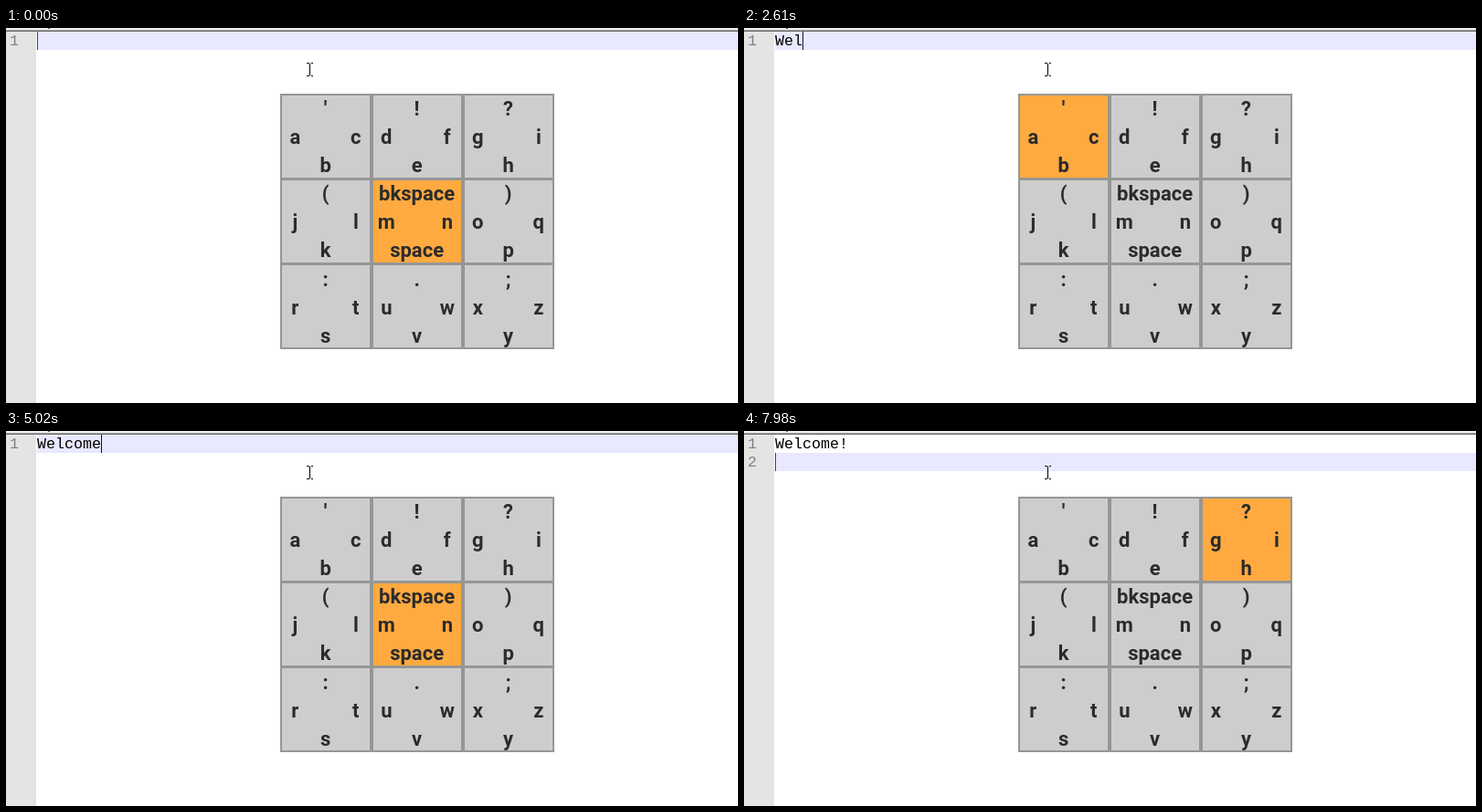
An HTML page that plays this animation: 801 px wide and 411 px high, repeating every 8 s.

```html
<!DOCTYPE html>
<html lang="en">
<head>
<meta charset="utf-8">
<title>Nine-key typing</title>
<style>
  html, body { margin: 0; width: 100%; height: 100%; overflow: hidden; background: #fff; }
  svg { display: block; width: 801px; height: 411px; }
  rect { shape-rendering: crispEdges; }
  .code { font: 16.667px "Courier New", "Liberation Mono", monospace; }
  .num { fill: #808080; }
  .label { font: 700 22px Roboto, sans-serif; fill: #2b2b2b; text-anchor: middle; }
  .popup { fill: #fff; stroke: #a8a8a8; filter: drop-shadow(2px 2px 2px rgba(0, 0, 0, .35)); }
</style>
</head>
<body>
<svg viewBox="0 0 801 411">
  <rect width="801" height="411" fill="#fff"/>
  <rect y="4" width="33" height="407" fill="#e4e4e4"/>
  <rect width="801" height="2" fill="#f0f0f0"/>
  <rect y="2" width="801" height="1" fill="#a0a0a0"/>
  <rect y="3" width="801" height="1" fill="#696969"/>
  <rect x="46" width="2" height="1" fill="#606060"/>

  <rect id="current" x="34" y="4" width="767" height="20" fill="#e8e8ff"/>
  <text class="code num" x="4" y="19">1</text>
  <text class="code num" id="second" x="4" y="39">2</text>
  <text class="code" id="typed" x="34" y="19"></text>
  <rect id="caret" width="1" height="20"/>
  <rect id="popup" class="popup" x="32.5" y="24.5" width="157" height="27"/>

  <rect x="300" y="72" width="300" height="280" fill="#969696"/>
  <g id="keys"></g>
  <g id="letters"></g>
  <g id="symbols"></g>

  <path d="M329 38.5h2.5M333.500 38.500h2.500M332.500 39v13M329 52.500h2.500M333.500 52.500h2.500" stroke="#000" fill="none" shape-rendering="crispEdges"/>
</svg>
<script>
const $ = id => document.getElementById(id);
const LOOP = 8000;

function add(parent, tag, attrs, text = '') {
  const node = document.createElementNS('http://www.w3.org/2000/svg', tag);
  for (const name in attrs) node.setAttribute(name, attrs[name]);
  node.textContent = text;
  parent.append(node);
  return node;
}

// Each key lists its top, left, right and bottom labels.
const letters = ["' a c b", '! d f e', '? g i h', '( j l k', 'bkspace m n space', ') o q p',
  ': r t s', '. u w v', '; x z y'];
const symbols = ['1 2 3 4', '5 6 7 8', '9 0 # =', '[ { } @', 'del esc tab enter', '] < > ^',
  '" $ & ;', '~ \\ _ |', '+ % / *'];
const spots = [[49.6, 24], [16.3, 55], [82.8, 55], [49.6, 86]];

const keys = letters.map((_, i) => add($('keys'), 'rect', {
  x: 302 + i % 3 * 100, y: 74 + Math.floor(i / 3) * 93, width: 96, height: 90
}));

function drawLabels(group, layer) {
  layer.forEach((labels, i) => labels.split(' ').forEach((label, j) => {
    const [dx, dy] = spots[j];
    add(group, 'text', {
      class: 'label',
      x: 300 + i % 3 * 100 + dx,
      y: 72 + Math.floor(i / 3) * 280 / 3 + dy
    }, label);
  }));
}
drawLabels($('letters'), letters);
drawLabels($('symbols'), symbols);

// Each step changes part of the state and keeps the rest.
const steps = [
  [0, { key: 4, text: '', caret: true, line: 1, popup: false, layer: 'letters' }],
  [230, { caret: false }],
  [440, { key: 7 }],
  [650, { caret: true }],
  [1080, { popup: true }],
  [1300, { popup: false, text: 'W' }],
  [1420, { key: 4 }],
  [1520, { key: 1 }],
  [1750, { caret: false }],
  [1850, { text: 'We', caret: true }],
  [2180, { key: 3 }],
  [2610, { text: 'Wel', key: 0 }],
  [3040, { text: 'Welc', key: 1 }],
  [3160, { key: 2 }],
  [3490, { key: 5, caret: false }],
  [3710, { text: 'Welco', caret: true }],
  [3930, { key: 4 }],
  [4360, { text: 'Welcom' }],
  [4480, { key: 1 }],
  [4800, { text: 'Welcome' }],
  [5020, { key: 4 }],
  [5230, { caret: false }],
  [5350, { key: 1 }],
  [5680, { text: 'Welcome!', caret: true }],
  [6110, { key: 4, caret: false }],
  [6330, { layer: 'symbols' }],
  [6780, { line: 2, caret: true }],
  [7100, { layer: 'letters' }],
  [7430, { caret: false }],
  [7860, { caret: true }],
  [7980, { key: 2 }]
];

const show = (id, on) => $(id).setAttribute('visibility', on ? 'visible' : 'hidden');

function render(time) {
  const state = {};
  for (const [start, change] of steps) if (start <= time) Object.assign(state, change);
  const { key, text, caret, line, popup, layer } = state;
  const column = line === 1 ? text.length : 0;
  const top = line * 20 - 16;

  keys.forEach((node, i) => node.setAttribute('fill', i === key ? '#ffaa40' : '#cdcdcd'));
  $('typed').textContent = text;
  $('current').setAttribute('y', top);
  $('caret').setAttribute('x', 34 + column * 10);
  $('caret').setAttribute('y', top);
  $('caret').setAttribute('fill', column ? '#101030' : '#8000ff');
  show('caret', caret);
  show('second', line === 2);
  show('popup', popup);
  show('letters', layer === 'letters');
  show('symbols', layer === 'symbols');
}

const begin = performance.now();
function tick() {
  render((performance.now() - begin) % LOOP);
  requestAnimationFrame(tick);
}
tick();
</script>
</body>
</html>
```
